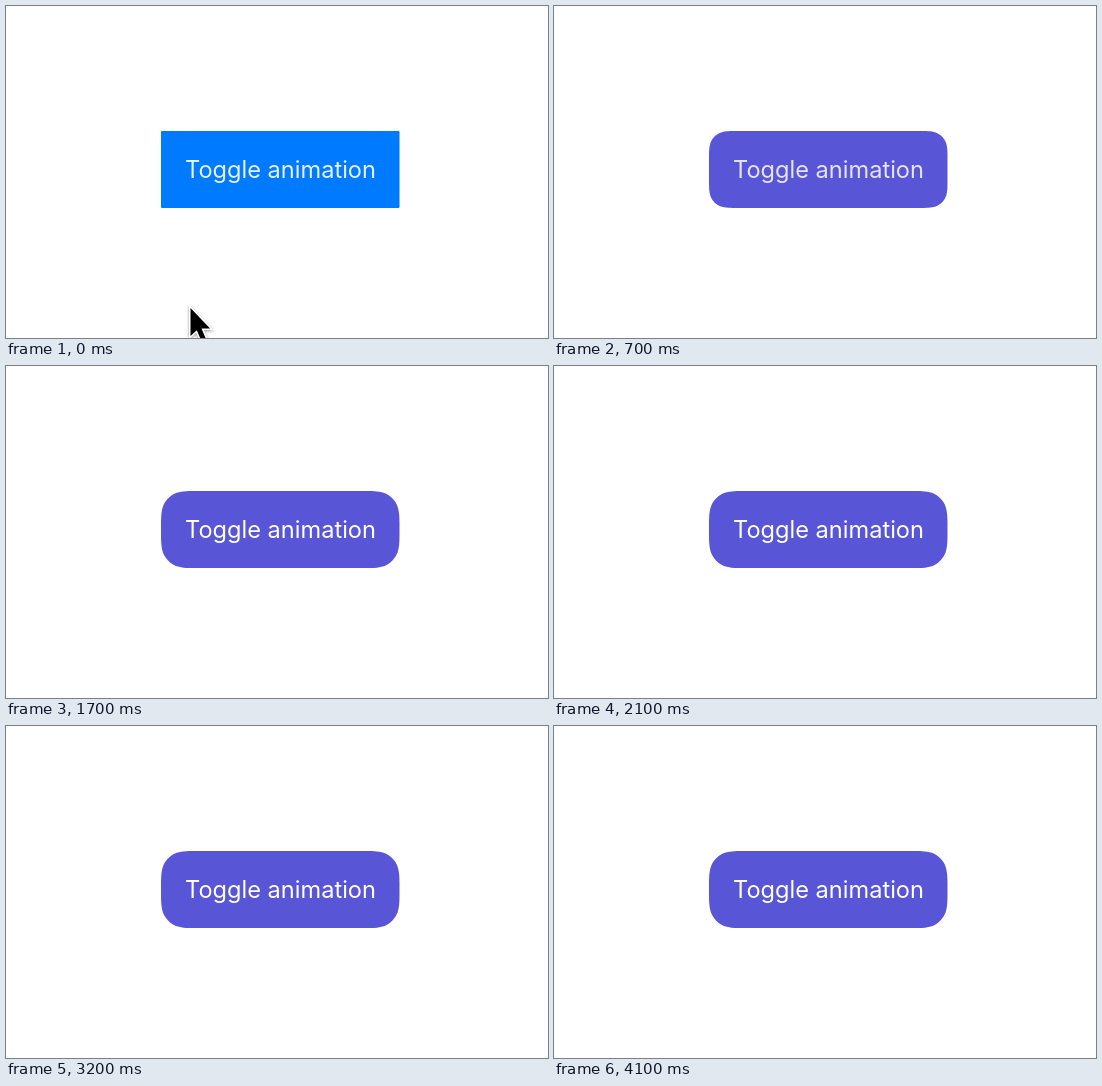
Recreate the animation shown at these times as an HTML page. Size 542 px wide and 332 px high, loop 4200 ms.

```html
<!DOCTYPE html>
<html lang="en">
<head>
<meta charset="utf-8">
<title>Toggle animation</title>
<style>
  html, body { margin: 0; width: 100%; height: 100%; overflow: hidden; background: #fff; }
  svg { display: block; }
  text { font: 400 23.6px Inter, "Liberation Sans", sans-serif; fill: #fff; text-anchor: middle; }
  #cursor { filter: drop-shadow(0 1.5px 1.5px rgba(0, 0, 0, .4)); }
</style>
</head>
<body>
<svg width="542" height="332" viewBox="0 0 542 332">
  <path id="button"/>
  <text id="label" x="274.5" y="172">Toggle animation</text>
  <g id="ring" fill="none">
    <circle cx="223.3" cy="184" r="42.8" stroke="#fff" stroke-width="6"/>
    <circle cx="223.3" cy="184" r="42.8" stroke="#000" stroke-width="3"/>
  </g>
  <path id="cursor" d="M0 0V28L6.3 22.2L10.8 32.8L15.4 30.8L11 20.4H19.6Z"
        stroke="#fff" stroke-width="3" paint-order="stroke"/>
</svg>
<script>
const LOOP = 4200, STEP = 100, PRESS = 400, RELEASE = 450, HIDE = 600;
const BOX = { left: 155, top: 125, right: 393.5, bottom: 202 };
const BLUE = [0, 122, 255], PURPLE = [88, 86, 214];
const [button, label, ring, cursor] =
  ["button", "label", "ring", "cursor"].map(id => document.getElementById(id));

const progress = (t, start, length) => Math.min(1, Math.max(0, (t - start) / length));
const easeOut = p => 1 - (1 - p) ** 2;
const mix = (a, b, p) => a + (b - a) * p;

// Continuous-curvature corner: three Béziers, as offsets from the corner in radii.
const CORNER = [
  [1.52866, 0], [1.08849, 0], [.86841, 0], [.63149, .07491],
  [.37282, .16906], [.16906, .37282], [.07491, .63149],
  [0, .86841], [0, 1.08849], [0, 1.52866]
];

function roundedBox({ left, top, right, bottom }, radius) {
  const corner = (x, y, dx, dy, reverse) => {
    const points = CORNER.map(([u, v]) => `${x + u * radius * dx} ${y + v * radius * dy}`);
    if (reverse) points.reverse();
    return `L${points[0]}C${points.slice(1).join(" ")}`;
  };
  const path = corner(right, top, -1, 1) + corner(right, bottom, -1, -1, true)
    + corner(left, bottom, 1, -1) + corner(left, top, 1, 1, true);
  return "M" + path.slice(1) + "Z";
}

function draw(now) {
  const t = Math.floor(now % LOOP / STEP) * STEP;

  const tint = easeOut(progress(t, RELEASE, 250));
  const radius = mix(1, 25, easeOut(progress(t, RELEASE, 500)));
  button.setAttribute("d", roundedBox(BOX, radius));
  button.setAttribute("fill", `rgb(${BLUE.map((c, i) => Math.round(mix(c, PURPLE[i], tint)))})`);

  const textAlpha = t < RELEASE ? .9 : mix(.8, 1, easeOut(progress(t, 650, 450)));
  label.setAttribute("fill-opacity", textAlpha);

  const move = easeOut(progress(t, 0, 350));
  cursor.setAttribute("transform", `translate(${mix(184.5, 223, move)} ${mix(302, 182, move)})`);
  cursor.style.display = t < HIDE ? "" : "none";
  ring.style.display = t >= PRESS && t < HIDE ? "" : "none";
}

const begin = performance.now();
function tick() {
  draw(performance.now() - begin);
  requestAnimationFrame(tick);
}
tick();
</script>
</body>
</html>
```
